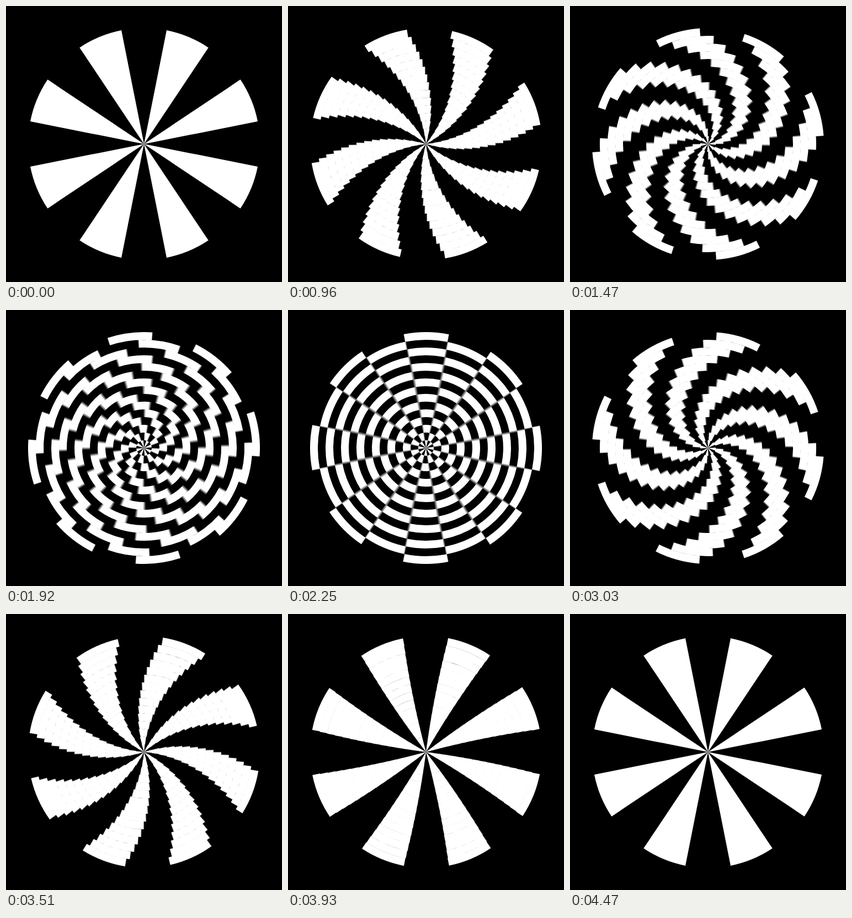
These frames come from a looping animation (500x500 px, 4.5 s). An HTML page with a canvas:

```html
<!DOCTYPE html>
<html lang="en">
<head>
<meta charset="utf-8">
<title>Twisting pinwheel</title>
<style>
  html, body { margin: 0; width: 100%; height: 100%; overflow: hidden; background: #000; }
  canvas { display: block; width: 500px; height: 500px; }
</style>
</head>
<body>
<canvas id="stage" width="500" height="500"></canvas>
<script>
const ctx = document.getElementById('stage').getContext('2d');
const CENTER = 250, RINGS = 15, RING_WIDTH = 14, BLADES = 8;
const STEP = 30, STEPS = 150;
const SAMPLES = 8, SHUTTER = 0.6;
const PITCH = 2 * Math.PI / BLADES;

const ease = p => p * p * (3 - 2 * p);

// The outermost ring turns by one pitch per loop, each ring inside it by one more.
function addRing(path, ring, twist) {
  const outer = RING_WIDTH * (RINGS + 1 - ring);
  const inner = outer - RING_WIDTH;
  for (let i = 0; i < BLADES; i++) {
    const from = PITCH * (i + 0.25) + ring * twist;
    const to = from + PITCH / 2;
    path.moveTo(CENTER + inner * Math.cos(from), CENTER + inner * Math.sin(from));
    path.arc(CENTER, CENTER, outer, from, to);
    path.arc(CENTER, CENTER, inner, to, from, true);
    path.closePath();
  }
}

function pinwheel(t) {
  const path = new Path2D();
  const twist = PITCH * ease(ease(t));
  for (let ring = 1; ring <= RINGS; ring++) addRing(path, ring, twist);
  return path;
}

// Averages several moments within the open shutter for motion blur.
function draw(step) {
  ctx.globalCompositeOperation = 'source-over';
  ctx.fillStyle = '#000';
  ctx.fillRect(0, 0, 500, 500);
  ctx.globalCompositeOperation = 'lighter';
  ctx.fillStyle = `rgba(255, 255, 255, ${1 / SAMPLES})`;
  for (let s = 0; s < SAMPLES; s++) {
    ctx.fill(pinwheel((step + s * SHUTTER / SAMPLES) / STEPS));
  }
}

const start = performance.now();
let shown = -1;

function tick() {
  const elapsed = performance.now() - start;
  const step = Math.floor(elapsed / STEP) % STEPS;
  if (step !== shown) draw(shown = step);
  requestAnimationFrame(tick);
}
tick();
</script>
</body>
</html>
```
